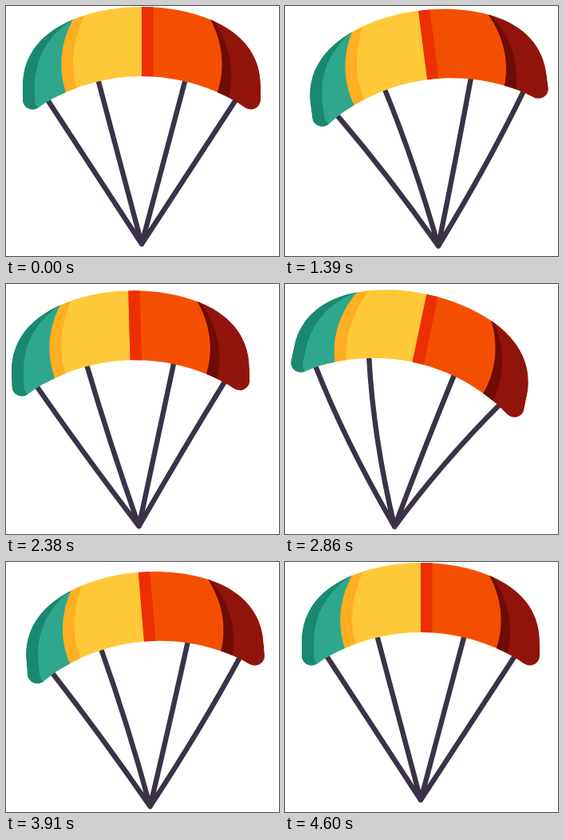
Recreate the animation shown at these times as an HTML page. Size 342 by 313 pixels, loop 4630 ms.

```html
<!DOCTYPE html>
<html lang="en">
<head>
<meta charset="utf-8">
<title>Swinging parachute</title>
<style>
  html, body { margin: 0; height: 100%; overflow: hidden; background: #fff; }
  svg { display: block; width: 100vw; height: 100vh; }
</style>
</head>
<body>
<svg viewBox="0 0 342 313">
  <defs>
    <clipPath id="outline">
      <path d="M170 1C138 1 108 7 84 17C48 32 21 58 21 101V117C21 127 32 133 41 127C52 119 63 113 75 108C104 95 137 88 170 88
               C203 88 236 95 265 108C277 113 288 119 299 127C308 133 319 127 319 117V101C319 58 292 32 256 17C232 7 202 1 170 1Z"/>
    </clipPath>
  </defs>
  <path id="strings" fill="none" stroke="#3a3347" stroke-width="6.4" stroke-linecap="round"/>
  <g id="canopy"><g clip-path="url(#outline)">
    <path fill="#ffc839" d="M60 0H170.5V135H60Z"/>
    <path fill="#f44f00" d="M170 0H285V135H170Z"/>
    <path fill="#ec2f00" d="M170 0H184.5V135H170Z"/>
    <path fill="#ffaf22" d="M84 17L98 12C84 43 80 74 89 104L75 114H55V17Z"/>
    <path fill="#2ea78d" d="M85 15L84 17C68 46 65 79 75 108V140H10V0H85Z"/>
    <path fill="#1a8870" d="M85 15L84 17C52 36 36 67 36 101V117Q36 124 41 128V140H10V0Z"/>
    <path fill="#91140c" d="M255 15L256 17C272 46 275 79 265 108V140H330V0H255Z"/>
    <path fill="#6f0c06" d="M256 16C272 46 275 79 265 108V118H278L279 114C287 82 281 47 258 16Z"/>
  </g></g>
</svg>
<script>
const LOOP = 4630;
const REST = { x: 170, y: 44.5, tip: 298 };
const BEATS = [1030, 1840, 2860, 3860, 4600];
const MAX_ANGLE = 17.8;

// Canopy anchor of each string and how strongly it bends.
const STRINGS = [[51, 116, 1], [115.5, 93, 1], [224.5, 93, 0.15], [289, 116, 1]];

// Value at a time, with sine easing from each pose to the next.
function ease(times, values, time) {
  const next = times.findIndex(at => at > time);
  if (next < 1) return values[0];
  const progress = (time - times[next - 1]) / (times[next] - times[next - 1]);
  const from = values[next - 1];
  return from + (values[next] - from) * (1 - Math.cos(Math.PI * progress)) / 2;
}

const canopy = document.getElementById('canopy');
const strings = document.getElementById('strings');

function draw(time) {
  if (time < BEATS[0]) time = 0;
  const angle = ease(BEATS, [0, -MAX_ANGLE, 11.9, -4.8, 0], time);
  const drift = ease([1030, 1450, 2240, 3290, 3990, 4600], [0, 2.8, -16.6, 7, -0.8, 0], time);
  // The tip leads the swing a little, and the sinking leads the tip.
  const tipX = REST.x + ease(BEATS, [0, 44, -33, 11, 0], time + 45);
  const sink = ease(BEATS, [0, 4.2, 5.7, 8.8, 0], time + 90);

  const x = REST.x + drift;
  const y = REST.y + 1.4 * sink + 6 * (angle / MAX_ANGLE) ** 2;
  const tipY = REST.tip + sink;

  const cos = Math.cos(angle * Math.PI / 180), sin = Math.sin(angle * Math.PI / 180);
  const place = (px, py) => {
    const dx = px - REST.x, dy = py - REST.y;
    return [x + dx * cos - dy * sin, y + dx * sin + dy * cos];
  };

  canopy.setAttribute('transform',
    `translate(${x} ${y}) rotate(${angle}) translate(${-REST.x} ${-REST.y})`);

  // Strings leave the canopy along its own axis and curve towards the real tip.
  const [axisX, axisY] = place(REST.x, REST.tip);
  strings.setAttribute('d', STRINGS.map(([anchorX, anchorY, bend]) => {
    const [sx, sy] = place(anchorX, anchorY);
    const aimX = tipX + (axisX - tipX) * bend, aimY = tipY + (axisY - tipY) * bend;
    const bendX = sx + (aimX - sx) * 0.47, bendY = sy + (aimY - sy) * 0.47;
    return `M${sx} ${sy}Q${bendX} ${bendY} ${tipX} ${tipY}`;
  }).join(''));
}

function tick() {
  draw(performance.now() % LOOP);
  requestAnimationFrame(tick);
}
tick();
</script>
</body>
</html>
```
